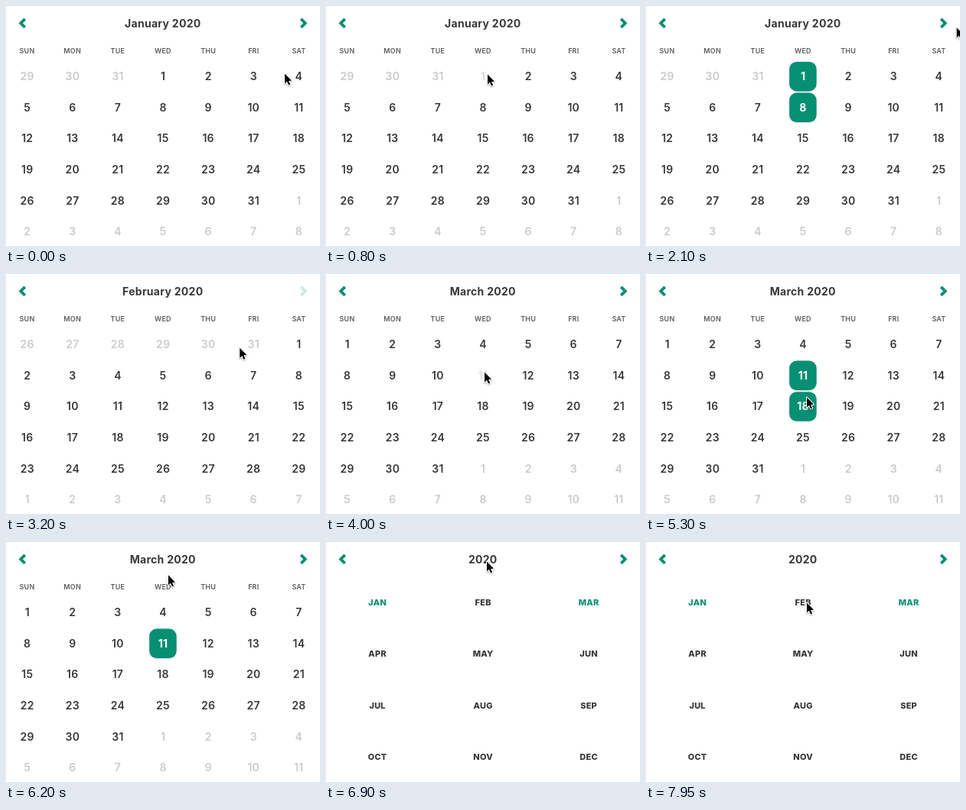
An HTML page with a canvas that plays this animation: 410x314 px, repeating every 8 s.

```html
<!DOCTYPE html>
<html lang="en">
<head>
<meta charset="utf-8">
<title>Calendar</title>
<style>
html, body { margin: 0; width: 100%; height: 100%; overflow: hidden; background: #fff; }
canvas { display: block; width: 410px; height: 314px; }
</style>
</head>
<body>
<canvas id="stage"></canvas>
<script>
const W = 410, H = 314, LOOP = 8000, STEP = 50, FADE = 250, DIM = 0.2;
const GREEN = '#078f73', INK = '#383838', MUTED = '#cbcbcb';
const MONTHS = ['January', 'February', 'March', 'April', 'May', 'June', 'July',
  'August', 'September', 'October', 'November', 'December'];
const WEEKDAYS = ['SUN', 'MON', 'TUE', 'WED', 'THU', 'FRI', 'SAT'];

const canvas = document.getElementById('stage');
const ctx = canvas.getContext('2d');
const scale = window.devicePixelRatio || 1;
canvas.width = W * scale;
canvas.height = H * scale;

// A tap dims its target at once, acts just after release, then fades back in.
const tap = (id, down, up) => ({ id, down, up, acts: up + STEP });
const taps = [
  tap('0-1', 800, 900), tap('0-8', 1400, 1500),
  tap('next', 2650, 2750), tap('next', 3000, 3200),
  tap('2-11', 3900, 4050), tap('2-18', 4550, 4650), tap('2-18', 5550, 5650),
  tap('title', 6450, 6650)
];
const tapCount = (id, t) => taps.filter(p => p.id === id && t >= p.acts).length;

// The pointer glides from stop to stop, bulging sideways by the bow.
const glide = (from, to, x, y, bowX = 0, bowY = 0) => ({ from, to, x, y, bowX, bowY });
const glides = [
  glide(0, 550, 210, 89, 0, 28),
  glide(1100, 1350, 210, 131, 17),
  glide(1600, 2400, 386, 22, 86, -33),
  glide(3020, 3450, 220, 141, -20, 31),
  glide(3500, 3650, 206, 128),
  glide(4300, 4450, 209, 161),
  glide(4700, 5300, 209, 161, 4, -94),
  glide(5750, 6300, 209, 25, 6, 19),
  glide(7250, 7650, 207, 90, 9),
  glide(7750, 7950, 209, 79)
];

function pointerAt(t) {
  let x = 363, y = 88;
  for (const g of glides) {
    if (t <= g.from) break;
    const u = Math.min(1, (t - g.from) / (g.to - g.from));
    const s = u * u * (3 - 2 * u), bulge = 4 * s * (1 - s);
    x += (g.x - x) * s + g.bowX * bulge;
    y += (g.y - y) * s + g.bowY * bulge;
  }
  return [x, y];
}

const easeInOut = u => u < 0.5 ? 2 * u * u : 1 - 2 * (1 - u) * (1 - u);

function opacity(id, t) {
  const p = taps.find(q => q.id === id && t >= q.down && t < q.up + FADE);
  if (!p) return 1;
  return t <= p.up ? DIM : DIM + (1 - DIM) * easeInOut((t - p.up) / FADE);
}

function label(text, x, y, size, weight, color) {
  const spacing = size * 0.02;
  ctx.font = `${weight} ${size}px Inter, sans-serif`;
  ctx.letterSpacing = spacing + 'px';
  ctx.textAlign = 'center';
  ctx.fillStyle = color;
  ctx.fillText(text, x + spacing / 2, y + size * 0.364);
}

function faded(alpha, draw) {
  ctx.globalAlpha = alpha;
  draw();
  ctx.globalAlpha = 1;
}

function chevron(x, dir) {
  ctx.beginPath();
  ctx.moveTo(x - dir * 2.8, 16.8);
  ctx.lineTo(x + dir * 2.8, 22.4);
  ctx.lineTo(x - dir * 2.8, 28);
  ctx.lineJoin = 'miter';
  ctx.strokeStyle = GREEN;
  ctx.lineWidth = 3.8;
  ctx.stroke();
}

function badge(x, y) {
  ctx.save();
  ctx.shadowColor = 'rgba(0, 70, 55, 0.3)';
  ctx.shadowBlur = 2 * scale;
  ctx.shadowOffsetY = 0.5 * scale;
  ctx.fillStyle = GREEN;
  ctx.beginPath();
  ctx.roundRect(x - 17.7, y - 19.2, 35.4, 38.4, 9.5);
  ctx.fill();
  ctx.restore();
}

function drawDays(month, t) {
  WEEKDAYS.forEach((name, i) => label(name, 27.4 + i * 59.15, 58.8, 9, 600, '#5c5c5c'));
  const lead = new Date(2020, month, 1).getDay();
  for (let i = 0; i < 42; i++) {
    const date = new Date(2020, month, 1 - lead + i);
    const inMonth = date.getMonth() === month;
    const id = inMonth ? month + '-' + date.getDate() : '';
    const x = 27.6 + (i % 7) * 59.1, y = 92.2 + Math.floor(i / 7) * 40.6;
    const on = tapCount(id, t) % 2 === 1;
    faded(opacity(id, t), () => {
      if (on) badge(x, y);
      label(date.getDate(), x, y, 14, on ? 700 : 600, on ? '#fff' : inMonth ? INK : MUTED);
    });
  }
}

function drawMonths(t) {
  MONTHS.forEach((name, i) => {
    const marked = taps.some(p => p.id.startsWith(i + '-') && tapCount(p.id, t) % 2);
    label(name.slice(0, 3).toUpperCase(), 67 + (i % 3) * 138,
      78.7 + Math.floor(i / 3) * 67.5, 11, 800, marked ? GREEN : INK);
  });
}

function drawPointer(x, y) {
  const shape = [[0, 0], [0, 13.2], [3, 10.4], [5, 15], [7.1, 14.1], [5.1, 9.6], [9, 9.4]];
  ctx.save();
  ctx.translate(x + 1, y + 0.4);
  ctx.beginPath();
  shape.forEach(p => ctx.lineTo(...p));
  ctx.closePath();
  ctx.lineJoin = 'round';
  ctx.strokeStyle = '#fff';
  ctx.lineWidth = 2;
  ctx.shadowColor = 'rgba(0, 0, 0, 0.35)';
  ctx.shadowBlur = 2 * scale;
  ctx.shadowOffsetY = scale;
  ctx.stroke();
  ctx.shadowColor = 'transparent';
  ctx.fillStyle = '#000';
  ctx.fill();
  ctx.restore();
}

function draw(t) {
  ctx.setTransform(scale, 0, 0, scale, 0, 0);
  ctx.fillStyle = '#fff';
  ctx.fillRect(0, 0, W, H);

  const yearView = tapCount('title', t) > 0;
  const month = tapCount('next', t);
  chevron(22, -1);
  faded(opacity('next', t), () => chevron(388, 1));
  faded(opacity('title', t), () =>
    label(yearView ? '2020' : MONTHS[month] + ' 2020', 204.6, 22.5, 14, 700, INK));
  if (yearView) drawMonths(t);
  else drawDays(month, t);
  drawPointer(...pointerAt(t));
}

const start = performance.now();
function tick() {
  const t = (performance.now() - start) % LOOP;
  draw(Math.floor(t / STEP) * STEP);
  requestAnimationFrame(tick);
}
tick();
</script>
</body>
</html>
```
